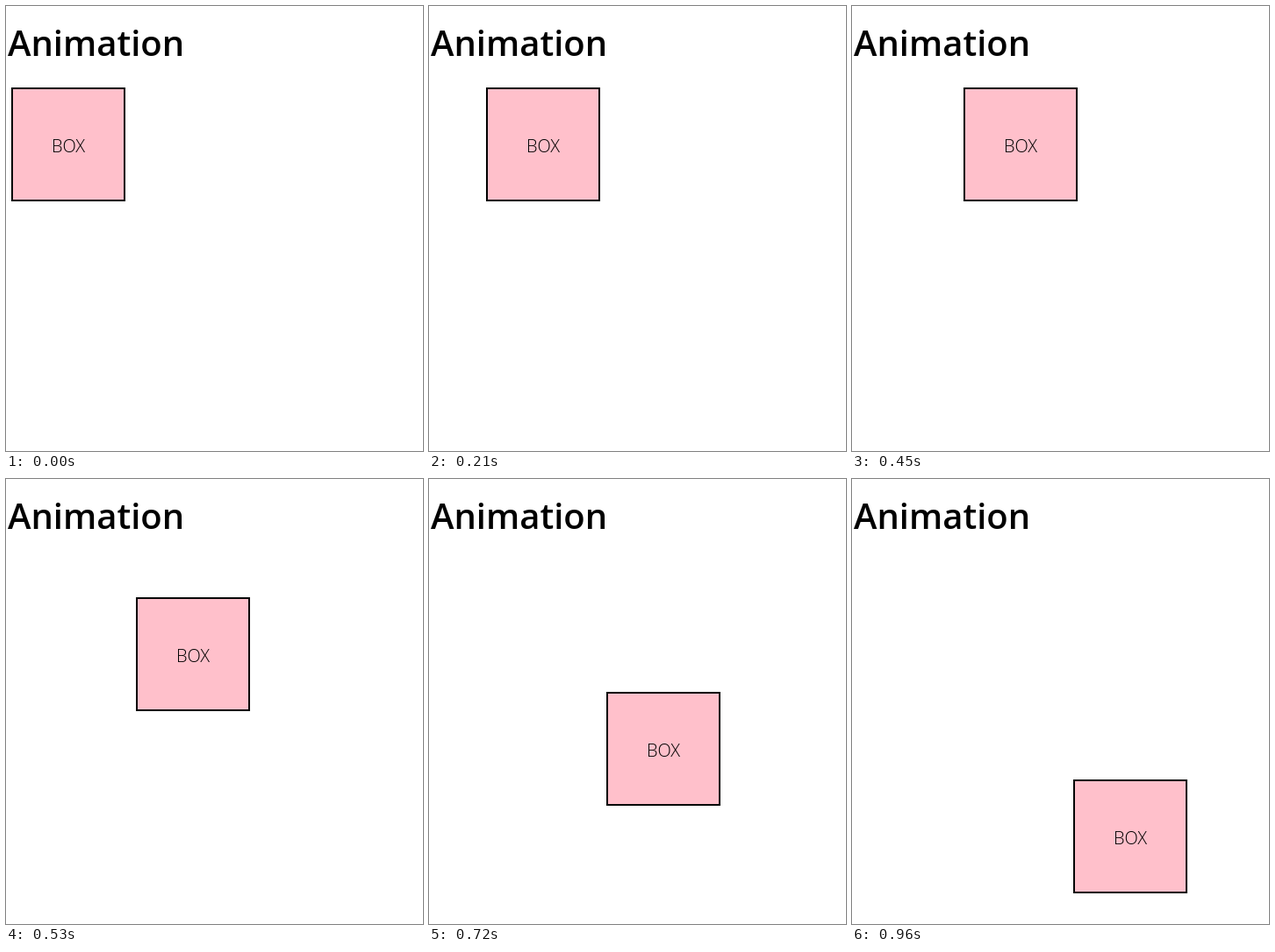
These frames come from a looping animation (475x508 px, 2260 ms). An HTML page:

```html
<!DOCTYPE html>
<html lang="en">
<head>
<meta charset="utf-8">
<title>Animation</title>
<style>
  html, body { margin: 0; width: 100%; height: 100%; overflow: hidden; background: #fff; }
  svg { display: block; width: 475px; height: 508px; font-family: "Open Sans", "Noto Sans", sans-serif; }
  .title { font-size: 40px; font-weight: 600; }
  .label { font-size: 20px; font-weight: 350; text-anchor: middle; }
  rect { fill: #ffc0cb; stroke: #000; stroke-width: 2; }
</style>
</head>
<body>
<svg viewBox="0 0 475 508">
  <text class="title" x="2" y="57">Animation</text>
  <g id="box">
    <rect x="1" y="1" width="128" height="128"/>
    <text class="label" x="65" y="74">BOX</text>
  </g>
</svg>
<script>
  const LOOP = 2260;
  const LEG = 30;     // ticks in one leg
  const TURN = 11;    // pose at which the second leg starts
  const LAST = 24;    // final pose
  const box = document.getElementById("box");

  // Poses are held for 50 and 30 ms in turn.
  const poseAt = time => Math.min(LAST, 2 * Math.floor(time / 80) + (time % 80 >= 50 ? 1 : 0));

  // Share of a leg covered after some poses, in whole ticks.
  const share = (first, rate, poses) => Math.min(LEG, Math.round(first + rate * poses)) / LEG;

  function draw(now) {
    const pose = poseAt(now % LOOP);
    let x, y = 93;
    if (pose < TURN) {
      x = 2 + 125 * share(1, 2.75, pose);
    } else {
      const part = share(0.2, 2.58, pose - TURN);
      x = 127 + 125 * part;
      y += 250 * part;
    }
    box.setAttribute("transform", `translate(${Math.round(x)} ${Math.round(y)})`);
  }

  const start = performance.now();
  function tick() {
    draw(performance.now() - start);
    requestAnimationFrame(tick);
  }
  tick();
</script>
</body>
</html>
```
